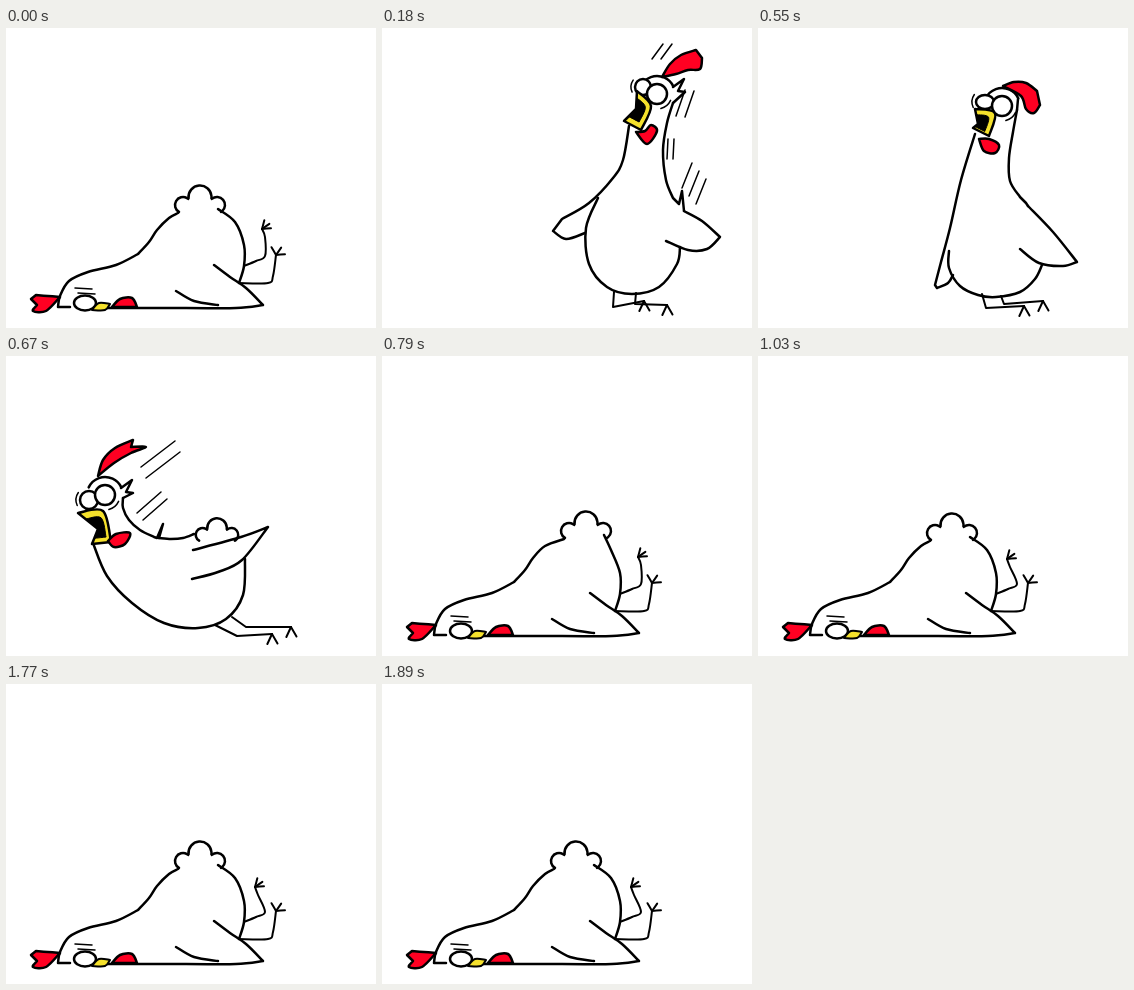
An HTML page with a canvas that plays this animation: 370x300 px, repeating every 1.95 s.

```html
<!DOCTYPE html>
<html lang="en">
<head>
<meta charset="utf-8">
<title>Fainting chicken</title>
<style>
html, body { margin: 0; width: 100%; height: 100%; overflow: hidden; background: #fff; }
canvas { display: block; }
</style>
</head>
<body>
<canvas id="stage" width="370" height="300"></canvas>
<script>
const ctx = document.getElementById('stage').getContext('2d');
const LOOP = 1950, STEP = 60, RAD = Math.PI / 180;
const INK = '#000', RED = '#ff0022', YELLOW = '#f5e12c', WHITE = '#fff';
const BOLD = 2.5, THIN = 2, FINE = 1.5;

// A path is a row of key points; "/" makes the point before it a sharp corner.
const parse = s => s.split('/').map(run => run.trim().split(' ').map(p => p.split(',').map(Number)));

function mix(a, b, t) {
  if (typeof a === 'number') return a + (b - a) * t;
  if (Array.isArray(a)) return a.map((v, i) => mix(v, b[i], t));
  return Object.fromEntries(Object.keys(a).map(k => [k, mix(a[k], b[k], t)]));
}

// Smooth curve through the points of each run.
function trace(runs) {
  let last = null;
  ctx.beginPath();
  for (const run of runs) {
    const p = last ? [last, ...run] : run;
    if (!last) ctx.moveTo(...p[0]);
    for (let i = 0; i < p.length - 1; i++) {
      const a = p[i], b = p[i + 1], before = p[i - 1] || a, after = p[i + 2] || b;
      ctx.bezierCurveTo(
        a[0] + (b[0] - before[0]) / 6, a[1] + (b[1] - before[1]) / 6,
        b[0] - (after[0] - a[0]) / 6, b[1] - (after[1] - a[1]) / 6, ...b);
    }
    last = p[p.length - 1];
  }
}

function ink(width) {
  ctx.lineWidth = width;
  ctx.stroke();
}

function line(runs, width = BOLD) {
  trace(runs);
  ink(width);
}

function shape(runs, fill, width = BOLD) {
  trace(runs);
  ctx.closePath();
  ctx.fillStyle = fill;
  ctx.fill();
  ink(width);
}

function arc(x, y, r, from, to, width = BOLD) {
  ctx.beginPath();
  ctx.arc(x, y, r, from * RAD, to * RAD);
  ink(width);
}

function eye(x, y, rx, ry) {
  ctx.beginPath();
  ctx.ellipse(x, y, rx, ry, 0, 0, 2 * Math.PI);
  ctx.fillStyle = WHITE;
  ctx.fill();
  ink(BOLD);
}

function toes([x, y], length, angles) {
  for (const a of angles) {
    line([[[x, y], [x + length * Math.cos(a * RAD), y + length * Math.sin(a * RAD)]]], THIN);
  }
}

function streaks(count, x, y, dx, dy, stepX, stepY) {
  for (let i = 0; i < count; i++, x += stepX, y += stepY) line([[[x, y], [x + dx, y + dy]]], FINE);
}

// Three feather bumps fanned around the middle one.
function tail(x, y, size = 1) {
  for (const i of [-1, 0, 1]) {
    const side = Math.abs(i), mid = 55 * i - 90;
    arc(x + 17 * i * size, y + 8 * side * size, (11.5 - 3.5 * side) * size, mid - 95, mid + 95);
  }
}

const pose = (ruffle, eyes, parts) =>
  ({ ruffle, eyes, ...Object.fromEntries(Object.entries(parts).map(([k, s]) => [k, parse(s)])) });

const jump = pose(1, [[261, 59, 8, 8], [275, 66, 10, 10]], {
  back: '291,75 285,95 281,122 284,152 291,170/297,176/300,163/302,183',
  wing: '302,183 320,193 338,209/325,221 306,222 284,213',
  front: '247,98 241,132 231,150 207,175 180,191/171,203/184,211 203,205',
  belly: '216,170 204,200 207,236 225,259 250,266 277,259 295,236 298,219',
  comb: '280,49 288,36 299,27 314,22/320,30/318,41 306,42 294,46 280,49',
  beak: '255,63 269,78 259,102/242,93/254,81/255,63',
  wattle: '254,104 263,103 269,97 275,103 265,116 254,104',
  legA: '232,264/231,279/262,273',
  legB: '254,265/253,276/285,277'
});

const stand = pose(0, [[227, 74, 9, 7], [244, 78, 10, 10]], {
  back: '259,82 255,104 251,130 252,153 262,169/266,173/268,175/270,178',
  wing: '270,178 295,204 319,234/305,238 281,235 262,221',
  front: '217,106 203,152 192,200 183,234 177,257/179,260/190,255 195,247',
  belly: '191,223 191,240 202,258 220,267 238,269 262,264 277,251 284,237',
  comb: '245,58 256,54 268,55 279,63/282,77/276,85 268,81 263,68 245,58',
  beak: '217,81 237,85 231,108/215,100/220,96/217,81',
  wattle: '221,111 231,111 241,117 237,125 226,123 221,111',
  legA: '224,266/228,280/266,278',
  legB: '243,268/246,276/285,273'
});

const dive = pose(1, [[83, 144, 9, 9], [99, 139, 10, 10]], {
  back: '117,142 117,152 123,164 134,174 148,181/151,182/157,168/153,182',
  wing: '187,194 235,181 262,171/236,204 212,216 186,223',
  front: '87,187 87,187 87,187 87,187 87,187/87,187/87,187 87,187',
  belly: '87,187 101,220 126,247 158,267 192,272 220,263 237,239 239,203',
  comb: '92,120 97,104 109,92 127,84/125,91/140,91 125,97 108,107 92,120',
  beak: '72,157 97,155 105,186/86,188/92,173/72,157',
  wattle: '102,185 110,178 124,177 119,188 108,191 102,185',
  legA: '209,269/231,280/266,278',
  legB: '226,261/240,271/285,271'
});

function upright(p) {
  const [left, right] = p.eyes, [x, y] = right;
  for (const leg of [p.legA, p.legB]) {
    line(leg, THIN);
    toes(leg[2][0], 11, [60, 115]);
  }
  for (const part of [p.back, p.wing, p.front, p.belly]) line(part);

  // Skull around the near eye, then the ruffled crest down to the neck.
  arc(x, y, 18, -155, -25);
  const crest = [[0, 0], [11, -8], [5, 4], [12, 5]].map(([dx, dy]) =>
    [[x + 16 + dx * p.ruffle, y - 7 + dy * p.ruffle]]);
  line([...crest, [p.back[0][0]]]);

  shape(p.comb, RED);
  eye(...left);
  shape(p.beak, YELLOW);
  const corner = p.beak[2][0];
  shape(p.beak.map(run => run.map(pt => mix(corner, pt, 0.62))), INK, 1);
  eye(...right);
  shape(p.wattle, RED);
  arc(left[0], left[1], left[2] + 4, 155, 215, FINE);
  arc(x, y, 15, 25, 75, FINE);
}

function leap() {
  upright(jump);
  streaks(2, 281, 16, -11, 15, 9, 0);
  streaks(2, 303, 62, -9, 26, 9, 1);
  streaks(2, 286, 111, -1, 20, 6, 0);
  streaks(3, 310, 135, -10, 25, 7, 8);
}

function plunge() {
  upright(dive);
  line(parse('153,182 165,183 177,182 188,178'));
  tail(211, 172, 0.85);
  streaks(2, 169, 85, -34, 26, 5, 11);
  streaks(2, 155, 136, -24, 21, 6, 7);
}

function lying(lift, kick) {
  const x = 194 + 10 * lift, y = 169 - 2 * lift;
  tail(x, y);
  line([[[132, 226], [143, 214], [151, 202], [163, 190], [x - 22, y + 16]]]);
  line([[[x + 18, y + 12], [229, 194], [238, 217], [238, 238], [233, 255]]]);
  line(parse('64,279 52,279/54,268 63,253 82,244 110,237 132,226'));
  line(parse('208,237 224,249 240,260 257,277/230,280 180,280 95,280'));
  line(parse('170,263 188,273 212,277'));
  streaks(2, 69, 260, 17, 1, 3, 5);

  const foot = kick ? [249, 203] : [256, 201];
  line([[[238, 238], [250, 233], [259, 228], [foot[0] + 3, foot[1] + 8], foot]], THIN);
  toes(foot, 9, [-75, -35, -5]);
  line(parse('233,255 262,255 267,248 270,227'), THIN);
  toes([270, 227], 9, [-120, -55, -5]);

  shape(parse('54,269 42,268 30,267/25,271/31,277/27,283 40,283 54,269'), RED);
  eye(79, 275, 11, 7.5);
  shape(parse('86,282 93,275 104,276/99,282 86,282'), YELLOW, THIN);
  shape(parse('106,279 114,271 126,270 131,279/106,279'), RED);
}

const scenes = [
  [60, () => lying(0)],
  [180, () => upright(mix(dive, jump, 0.5))],
  [240, leap],
  [300, () => upright(mix(jump, stand, 0.45))],
  [550, () => upright(mix(jump, stand, 0.75))],
  [610, () => upright(stand)],
  [670, () => upright(mix(stand, dive, 0.5))],
  [730, plunge]
];

// Once down, the tail settles and one foot twitches twice.
function faint(t) {
  const lift = Math.max(0, 1.5 - 0.5 * Math.floor((t - 730) / STEP));
  const kick = [1030, 1770].some(s => t >= s && t < s + 3 * STEP && Math.floor((t - s) / STEP) % 2 === 0);
  lying(lift, kick);
}

const start = performance.now();

function frame() {
  const t = (performance.now() - start) % LOOP;
  ctx.fillStyle = WHITE;
  ctx.fillRect(0, 0, 370, 300);
  ctx.strokeStyle = INK;
  ctx.lineCap = ctx.lineJoin = 'round';
  const scene = scenes.find(([end]) => t < end);
  if (scene) scene[1]();
  else faint(t);
  requestAnimationFrame(frame);
}
frame();
</script>
</body>
</html>
```
